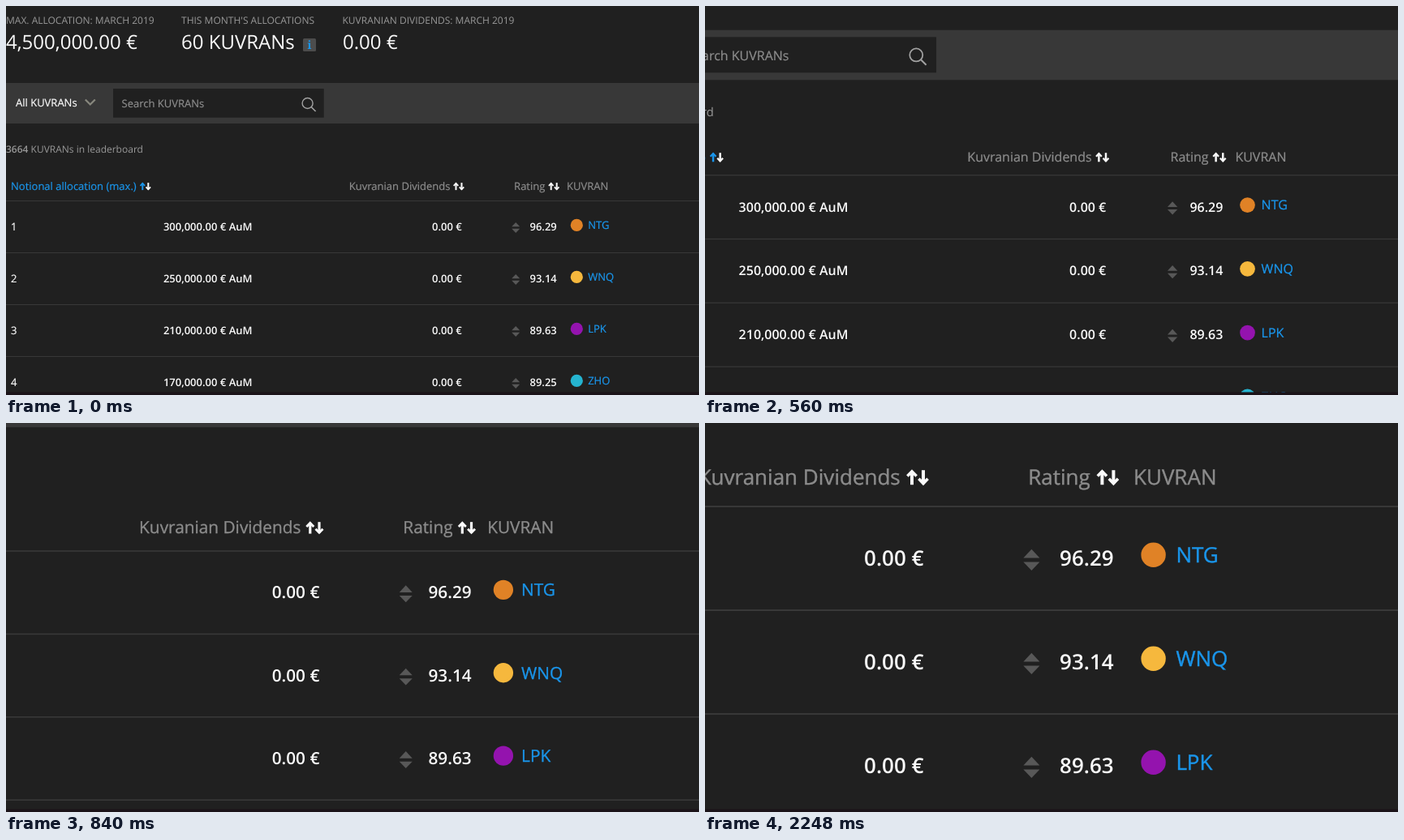
These frames come from a looping animation (854x480 px, 3 s). An HTML page:

```html
<!DOCTYPE html>
<html lang="en">
<head>
<meta charset="utf-8">
<title>Leaderboard zoom</title>
<style>
  html, body { margin: 0; width: 100%; height: 100%; overflow: hidden; background: #202020; }
  svg { display: block; width: 100vw; height: 100vh; }
  text { font-family: "Open Sans", "Noto Sans", sans-serif; text-rendering: geometricPrecision; }
</style>
</head>
<body>
<svg id="stage" viewBox="0 0 854 480">
  <rect width="854" height="480" fill="#202020"/>
  <g id="page"></g>
  <rect y="476.5" width="854" height="3.5" fill="#1b1319"/>
</svg>
<script>
const NS = "http://www.w3.org/2000/svg";
const page = document.getElementById("page");

const WHITE = "#fafafa", GRAY = "#8c8c8c", LABEL = "#989898", BLUE = "#1a96ec";

function add(tag, attrs, content) {
  const el = document.createElementNS(NS, tag);
  for (const key in attrs) el.setAttribute(key, attrs[key]);
  if (content) el.textContent = content;
  page.appendChild(el);
  return el;
}

function text(x, y, content, fill, size = 13, more = {}) {
  return add("text", { x, y, fill, "font-size": size, ...more }, content);
}

// A hairline outline gives small text a slightly firmer stem.
const firm = color => ({ stroke: color, "stroke-width": 0.2 });

const rect = (x, y, width, height, fill, rx = 0) =>
  add("rect", { x, y, width, height, fill, rx });

const shape = (d, fill) => add("path", { d, fill });

const stroke = (d, color, width) =>
  add("path", { d, fill: "none", stroke: color, "stroke-width": width });

// Up and down arrows of a sortable column; x is the left edge.
function sortArrows(x, upColor = WHITE) {
  const arrow = (cx, tip, dir, color) => {
    stroke(`M${cx} ${tip + dir}V${tip + 9.5 * dir}`, color, 2);
    stroke(`M${cx - 2.8} ${tip + 4.2 * dir}L${cx} ${tip + 1.3 * dir}L${cx + 2.8} ${tip + 4.2 * dir}`, color, 1.8);
  };
  arrow(x + 3.5, 217.6, 1, upColor);
  arrow(x + 10.5, 227.6, -1, WHITE);
}

function drawSummary() {
  text(0, 22, "MAX. ALLOCATION: MARCH 2019", LABEL, 12);
  text(0, 53, "4,500,000.00 €", WHITE, 24);
  text(216, 22, "THIS MONTH'S ALLOCATIONS", LABEL, 12);
  text(216, 53, "60 KUVRANs", WHITE, 24);
  rect(366, 40, 16, 16, "#4c4c4c", 1.5);
  text(374, 53, "i", BLUE, 14, {
    "text-anchor": "middle", "font-weight": 700,
    style: 'font-family: "Noto Serif", serif'
  });
  text(414.5, 22, "KUVRANIAN DIVIDENDS: MARCH 2019", LABEL, 12);
  text(415, 53, "0.00 €", WHITE, 24);
}

function drawToolbar() {
  rect(0, 95, 854, 50, "#383838");
  text(12, 124, "All KUVRANs", WHITE, 13, firm(WHITE));
  stroke("M97.8 115.5L103.8 121.5L109.8 115.5", "#88887e", 2.2);
  rect(132, 102, 259.7, 35.7, "#202020");
  text(142.5, 125, "Search KUVRANs", GRAY, 13, firm(GRAY));
  add("circle", { cx: 371.6, cy: 120, r: 6.5, fill: "none", stroke: "#a2a2a2", "stroke-width": 1.4 });
  stroke("M376.3 124.7L381.6 130", "#a2a2a2", 1.6);
}

function drawHeader() {
  const count = text(0, 181, "", LABEL, 12);
  const number = document.createElementNS(NS, "tspan");
  number.setAttribute("font-weight", 600);
  number.textContent = "3664";
  count.append(number, " KUVRANs in leaderboard");

  text(6, 227, "Notional allocation (max.)", BLUE, 13, firm(BLUE));
  sortArrows(164.8, BLUE);
  text(547.4, 227, "Kuvranian Dividends", GRAY, 13, { "text-anchor": "end", ...firm(GRAY) });
  sortArrows(551);
  text(626.1, 227, "Rating", GRAY, 13, firm(GRAY));
  sortArrows(668.2);
  text(691, 227, "KUVRAN", GRAY, 13, firm(GRAY));
}

function drawRow(row, index) {
  const [amount, rating, color, name] = row;
  const top = 240 + 64 * index;
  const base = top + 37;
  const value = (x, content) =>
    text(x, base, content, WHITE, 13, { "text-anchor": "end", "font-weight": 600 });

  rect(0, top, 854, 1, "#383838");
  text(6, base, String(index + 1), WHITE, 13, firm(WHITE));
  value(303.5, amount + ",000.00 € AuM");
  value(561.8, "0.00 €");
  shape(`M623.2 ${top + 32.3}l5 -5.4l5 5.4z`, "#585858");
  shape(`M623.2 ${top + 34.8}l5 5.2l5 -5.2z`, "#585858");
  value(678.8, rating);
  add("circle", { cx: 703.3, cy: top + 30.4, r: 7.6, fill: color });
  text(717.2, top + 35, name, BLUE, 13, firm(BLUE));
}

drawSummary();
drawToolbar();
drawHeader();
[
  ["300", "96.29", "#e08226", "NTG"],
  ["250", "93.14", "#f6b83d", "WNQ"],
  ["210", "89.63", "#9413ae", "LPK"],
  ["170", "89.25", "#25b4d0", "ZHO"]
].forEach(drawRow);

// The visible window narrows to half its width in eighths, held on a 140 ms beat.
const LOOP = 3000, BEAT = 140, START = 420;
const EIGHTHS = [0, 2, 3, 4, 6, 7, 8];
const PIVOT = { x: 854, y: 378 };

function render(time) {
  const t = time % LOOP;
  const step = t < START ? 0 : Math.min(6, 1 + Math.floor((t - START) / BEAT));
  const scale = 1 / (1 - EIGHTHS[step] / 16);
  const dx = PIVOT.x * (1 - scale), dy = PIVOT.y * (1 - scale);
  page.setAttribute("transform", `translate(${dx} ${dy}) scale(${scale})`);
}

let start = null;
function tick(now) {
  if (start === null) start = now;
  render(Math.max(0, now - start));
  requestAnimationFrame(tick);
}
render(0);
requestAnimationFrame(tick);
</script>
</body>
</html>
```
